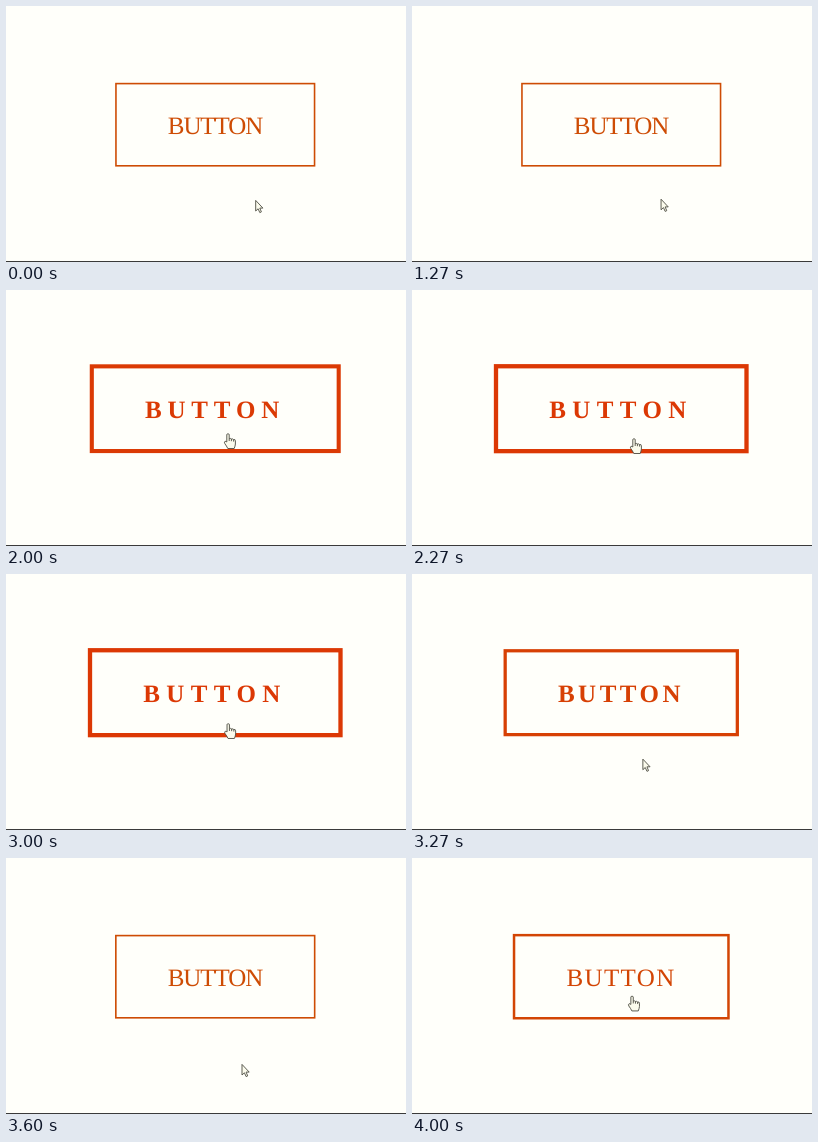
An HTML page for the animation above (4.07 s loop, 400 px wide and 256 px high).

```html
<!DOCTYPE html>
<html lang="en">
<head>
<meta charset="utf-8">
<title>Button hover</title>
<style>
  html, body { margin: 0; width: 100%; height: 100%; overflow: hidden; background: #fffffa; }
  svg { display: block; width: 400px; height: 256px; }
  text { font: 25px "Liberation Serif", "Times New Roman", serif; text-rendering: geometricPrecision; }
  .cursor path { fill: #fbfbec; stroke: #4c4c42; stroke-width: .9; stroke-linejoin: round; }
</style>
</head>
<body>
<svg viewBox="0 0 400 256">
  <rect y="255" width="400" height="1" fill="#3a3a3a"/>
  <rect id="frame" fill="none"/>
  <text id="label" y="127.5">BUTTON</text>
  <g id="arrow" class="cursor">
    <path d="M0 .4V11L2.4 8.8 4.1 12.6 5.7 11.9 4.1 8.1H7.2Z"/>
  </g>
  <g id="hand" class="cursor">
    <path d="M-1.2 9V1.6Q-1.2.8 0 .8T1.2 1.6V5.6Q2.4 5 3.4 6 4.7 5.5 5.6 6.6 7.4 6.1 7.4 7.8V11Q7.2 13 6.2 15.5H-.2Q-1.4 13-3.2 10.6-4.1 8.8-3 8.3-2 8.2-1.2 9Z"/>
    <path d="M1.2 5.6V8M3.4 6V8.2M5.6 6.6V8.6"/>
  </g>
</svg>
<script>
const LOOP = 4070, FPS = 15, FADE = 500;
const ENTER = 1667, LEAVE = 3147, RETURN = 3892;
const CENTER = 209.25, PADDING = 51.1;
const INNER_TOP = 78.4, INNER_HEIGHT = 80.6;
const TEXT_WIDTH = { 400: 101.4, 700: 105.6 };

// Each move glides from the previous resting point.
const home = { x: 249.7, y: 194 };
const moves = [
  { from: 1200, to: 1930, x: 222, y: 143 },
  { from: 2000, to: 2270, x: 222, y: 148 },
  { from: 2960, to: 3480, x: 236, y: 206 },
  { from: 3600, to: 4050, x: 219.5, y: 135 }
];

const $ = id => document.getElementById(id);
const frame = $("frame"), label = $("label"), arrow = $("arrow"), hand = $("hand");
const lerp = (a, b, p) => a + (b - a) * p;
const clamp = p => Math.min(1, Math.max(0, p));
const smooth = p => p * p * (3 - 2 * p);
const set = (el, attrs) => {
  for (const name in attrs) el.setAttribute(name, attrs[name]);
};

// CSS "ease": cubic-bezier(.25, .1, .25, 1)
function ease(x) {
  if (x <= 0) return 0;
  if (x >= 1) return 1;
  const bezier = (a, b, s) => 3 * a * s * (1 - s) ** 2 + 3 * b * s * s * (1 - s) + s ** 3;
  let low = 0, high = 1;
  for (let i = 0; i < 24; i++) {
    const mid = (low + high) / 2;
    if (bezier(.25, .25, mid) < x) low = mid; else high = mid;
  }
  return bezier(.1, 1, low);
}

function pointer(t) {
  return moves.reduce((at, { from, to, x, y }) => {
    const p = smooth(clamp((t - from) / (to - from)));
    return { x: lerp(at.x, x, p), y: lerp(at.y, y, p) };
  }, home);
}

function drawButton(p) {
  const weight = p > 1 / 3 ? 700 : 400;
  const border = lerp(1.6, 4.3, p);
  const spacing = lerp(-1.1, 6.4, p);
  const inner = TEXT_WIDTH[weight] + 6 * spacing + 2 * PADDING;
  const left = CENTER - inner / 2;
  const color = `rgb(${lerp(206, 220, p)}, ${lerp(76, 56, p)}, 4)`;

  set(frame, {
    x: left - border / 2, y: INNER_TOP - border / 2,
    width: inner + border, height: INNER_HEIGHT + border,
    stroke: color, "stroke-width": border
  });
  set(label, { x: left + PADDING, fill: color });
  label.style.fontWeight = weight;
  label.style.letterSpacing = spacing + "px";
}

function drawCursor(t, hovering) {
  const { x, y } = pointer(t);
  arrow.style.display = hovering ? "none" : "";
  hand.style.display = hovering ? "" : "none";
  set(hovering ? hand : arrow, { transform: `translate(${x} ${y})` });
}

function draw(t) {
  const since = start => ease((t - start) / FADE);
  drawButton(since(ENTER) - since(LEAVE) + since(RETURN));
  drawCursor(t, (t >= ENTER && t < LEAVE) || t >= RETURN);
}

const start = performance.now();
function tick(now) {
  const t = Math.max(0, now - start) % LOOP;
  const step = Math.min(60, Math.floor((t + 5) * FPS / 1000));
  draw(step * 1000 / FPS);
  requestAnimationFrame(tick);
}
draw(0);
requestAnimationFrame(tick);
</script>
</body>
</html>
```
